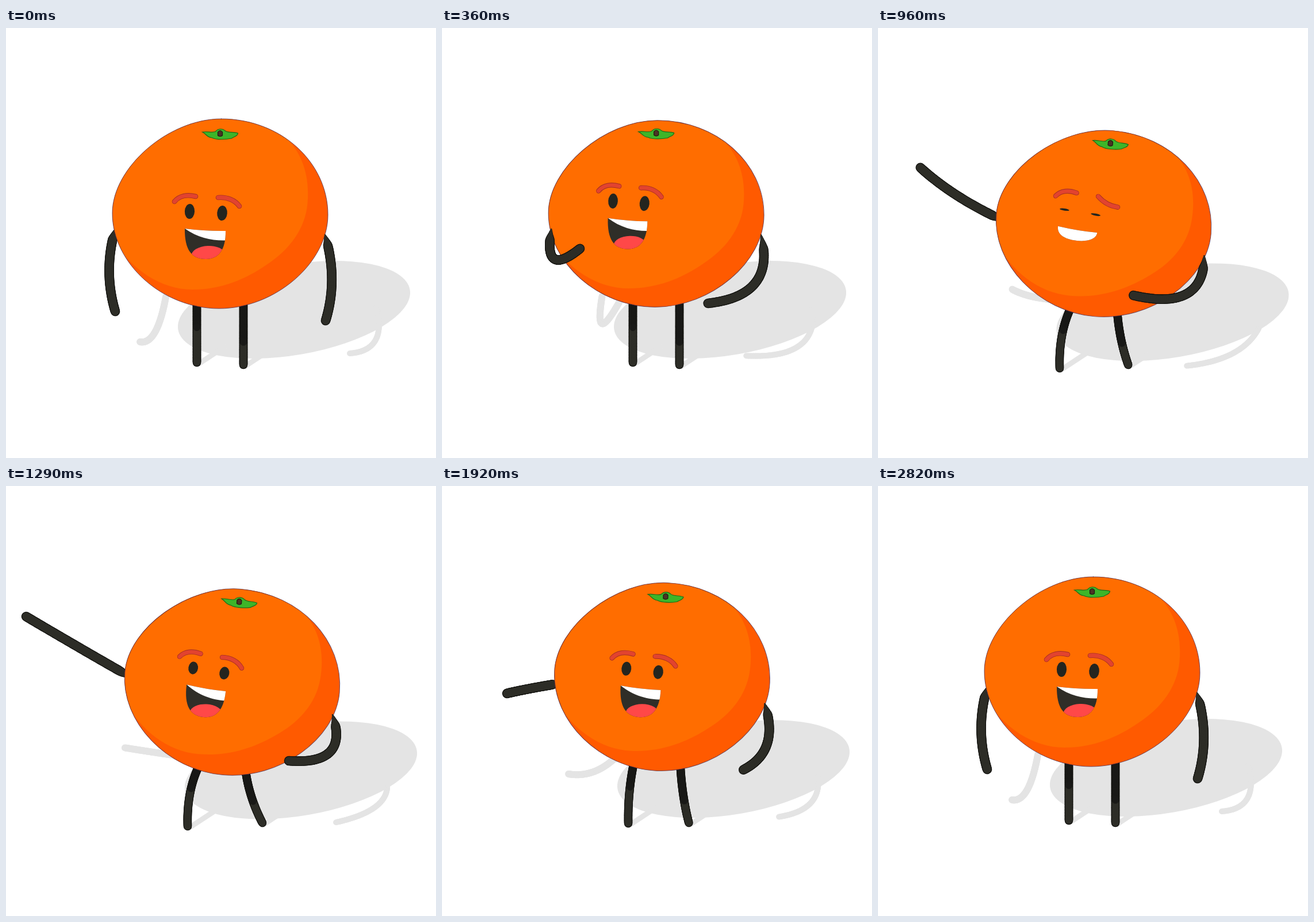
These frames come from a looping animation (748x748 px, 2850 ms). An HTML page with a canvas:

```html
<!DOCTYPE html>
<html lang="en">
<head>
<meta charset="utf-8">
<title>Pointing orange</title>
<style>
html, body { margin: 0; width: 100%; height: 100%; overflow: hidden; background: #fff; }
canvas { display: block; }
</style>
</head>
<body>
<canvas id="stage" width="748" height="748"></canvas>
<script>
const ctx = document.getElementById('stage').getContext('2d');
const LOOP = 2850, SHADE = '#e4e4e4';
const mix = (a, b, k) => a + (b - a) * k;
const ramp = (t, from, to) => {
  const u = Math.max(0, Math.min(1, (t - from) / (to - from)));
  return u * u * (3 - 2 * u);
};
// Rises from 0 to 1, stays there, and falls back as the character relaxes.
const act = (t, from, to) => ramp(t, from, to) - ramp(t, 1680, 2160);
// 1, but dipping to 0 around a moment.
const dip = (t, at, hold, fade) => ramp(Math.abs(t - at), hold, hold + fade);

// Arm poses are [elbow x, elbow y, hand x, hand y].
const BEATS = [0, 360, 600, 960, 1110, 1680, 2160];
const swing = (rest, fold, raise, reach, out) => [rest, fold, raise, reach, out, out, rest];
const LEFT = swing([169, 422, 190, 493], [175, 436, 240, 384], [144, 362, 181, 322],
  [132, 296, 74, 243], [128, 282, 35, 227]);
const RIGHT = swing([578, 437, 556, 509], [582, 466, 463, 479], [552, 509, 364, 446],
  [568, 494, 444, 465], [598, 486, 492, 478]);

// Hermite curve through the poses, flat at holds and turning points.
function pose(keys, t) {
  const last = BEATS.length - 1;
  if (t >= BEATS[last]) return keys[last];
  const i = BEATS.findIndex(b => b > t) - 1;
  const span = BEATS[i + 1] - BEATS[i], u = (t - BEATS[i]) / span, w = 1 - u;
  const slope = (j, c) => (keys[j + 1][c] - keys[j][c]) / (BEATS[j + 1] - BEATS[j]);
  const tangent = (j, c) => {
    if (j === 0 || j === last) return 0;
    const a = slope(j - 1, c), b = slope(j, c);
    return a * b <= 0 ? 0 : 2 * a * b / (a + b);
  };
  return keys[i].map((v, c) => v * w * w * (1 + 2 * u) + keys[i + 1][c] * u * u * (3 - 2 * u)
    + span * u * w * (tangent(i, c) * w - tangent(i + 1, c) * u));
}

const bend = (p, u) => [0, 1].map(k =>
  mix(mix(p[k], p[k + 2], u), mix(p[k + 2], p[k + 4], u), u));

function limb(p, radius, color, end = 1, taper = false) {
  const steps = 60;
  ctx.strokeStyle = color;
  ctx.lineCap = 'round';
  for (let i = 0; i < steps; i++) {
    const u = i / steps * end;
    ctx.lineWidth = 2 * radius * (taper ? Math.min(1, .15 + u * 7) : 1);
    ctx.beginPath();
    ctx.moveTo(...bend(p, u));
    ctx.lineTo(...bend(p, (i + 1) / steps * end));
    ctx.stroke();
  }
}

function arm(p) {
  limb(p, 8.3, '#12120f', 1, true);
  limb(p, 7, '#2d2d27', 1, true);
}

function leg(p, shaded) {
  limb(p, 7.3, '#12120f');
  limb(p, 6.1, '#2d2d27');
  limb(p, 6.1, '#191917', shaded);
}

function shape(d, fill, stroke, width = 1) {
  const path = new Path2D(d);
  if (fill) { ctx.fillStyle = fill; ctx.fill(path); }
  if (stroke) { ctx.strokeStyle = stroke; ctx.lineWidth = width; ctx.stroke(path); }
  return path;
}

function oval(x, y, rx, ry, angle, fill) {
  ctx.fillStyle = fill;
  ctx.beginPath();
  ctx.ellipse(x, y, rx, ry, angle, 0, 7);
  ctx.fill();
}

function place(x, y, degrees, sx, sy) {
  ctx.save();
  ctx.translate(x, y);
  ctx.rotate(degrees * Math.PI / 180);
  ctx.scale(sx, sy);
}

// Casts an arm on the ground; the resting hand lands on (x, y).
function castArm(p, rest, x, y, lean, radius) {
  const cast = (px, py, sag) => {
    const dx = px - rest[2], dy = py - rest[3];
    return [x + .84 * dx - .316 * dy + 20 * lean + 25 * sag,
      y - .2225 * dx + .553 * dy + 22 * lean + 40 * sag];
  };
  limb([...cast(p[0], p[1], 0), ...cast(p[2], p[3], 1 - lean), ...cast(p[4], p[5], 0)], radius, SHADE);
}

function castLeg(x, y, length) {
  ctx.lineWidth = 9;
  ctx.beginPath();
  ctx.moveTo(x + 5, y + 1);
  ctx.lineTo(x + 5 + length, y + 1 - length * .66);
  ctx.stroke();
}

function drawBody(x, y, lean, turn) {
  const skin = 'M2-165C105-165 187.5-90 187.5 2C187.5 85 96 165-2 165C-100 165-187.5 87-187.5-1C-187.5-80-90-165 2-165Z';
  place(x, y, 5 * lean, 1, 1 - .016 * turn);
  const path = shape(skin, '#ff5a00');
  ctx.save();
  ctx.clip(path);
  shape('M116-131C150-96 155-53 152-18C148 27 120 63 82 88C45 114 2 132-48 132C-103 132-153 97-181 52L-230 50V-200H116Z', '#ff6d00');
  ctx.restore();
  shape(skin, null, 'rgba(70,35,75,.75)');
  ctx.translate(0, -139 - 3 * turn);
  shape('M-31-3C-22-5-14-1-8-4C-3-10 5-9 9-5C15-1 23-4 31-1C31 4 24 5 20 8C10 10-6 11-14 7C-24 6-24 0-31-3Z', '#3db529', '#1e6b18', 1.2);
  shape('M-4 3V-3Q0-8 4-3V3Q0 6-4 3Z', '#4b3424', '#201711', 1.2);
  ctx.restore();
}

function drawFace(x, y, lean, turn, eyes, mouth) {
  const shut = 1 - mouth, tall = mix(1.9, 13 - 2 * lean, eyes);
  place(x - 25 + turn * (7 * lean - 23), y - 2.5 - 17.5 * turn, 1.3 * turn + 5 * lean, 1 - .03 * turn, 1);
  oval(-28, -1.5, 8.6, tall, .04, '#24251f');
  oval(28.5, 1.5, 8.8, tall, .08, '#24251f');

  ctx.save();
  ctx.translate(8 * shut, -5 * shut);
  const left = 'M-54.5-18.5C-46-29-32-31-17.5-27.5';
  const right = `M21.5-25.5C${mix(31, 37, mouth)} ${mix(-17, -27, mouth)} ${mix(43, 51, mouth)} ${mix(-11, -21, mouth)} 58.5-10.5`;
  ctx.lineCap = 'round';
  for (const brow of [left, right]) {
    shape(brow, null, '#a52f22', 8.6);
    shape(brow, null, '#e2432f', 6.8);
  }
  ctx.restore();

  const low = mix(50, 81.5, mouth), corner = mix(42, 66, mouth), drop = 34 * shut;
  ctx.save();
  ctx.clip(shape(`M-36.5 28.5Q0 33 34.5 32.5C35 ${corner} 22 ${low} 0 ${low}C-24 ${low}-37 ${corner}-36.5 28.5Z`, '#2f2e28'));
  oval(4, 74, 29, 15.5, -.05, '#ff4848');
  shape(`M-37 28L36 30V49C12 ${50 + drop}-13 ${45 + drop}-37 ${28 + drop * .6}Z`, '#fff');
  ctx.restore();
  ctx.restore();
}

function draw(t) {
  const lean = act(t, 330, 1050), turn = act(t, 0, 360);
  const stepLeft = act(t, 480, 810), stepRight = act(t, 720, 1110);
  const x = 372.5 + 21 * lean, y = 323 + 18 * lean;
  const leftArm = [190 + 33 * lean, 350 - 14 * lean, ...pose(LEFT, t)];
  const rightArm = [555 + 13 * lean, 360 + 38 * lean, ...pose(RIGHT, t)];
  const leftLeg = [332 + 3 * lean, 478 + 10 * lean, 332 - 18 * stepLeft, 533, 332 - 16 * stepLeft, 582 + 10 * stepLeft];
  const rightLeg = [413 + 3 * lean, 478 + 12 * lean, 413 + 9 * stepRight, 540, 413 + 33 * stepRight, 586];
  const folded = t > 120 && t < 530;

  ctx.clearRect(0, 0, 748, 748);
  oval(501 + 12 * lean, 490 + 4.5 * lean, 204.6, 78.6, -.171, SHADE);
  castArm(leftArm, LEFT[0], 233, 546, lean, 6);
  castArm(rightArm, RIGHT[0], 598, 566, lean, 5);
  castLeg(leftLeg[4], leftLeg[5], 43);
  castLeg(rightLeg[4], rightLeg[5], 27);

  leg(leftLeg, .4);
  leg(rightLeg, .6);
  if (!folded) arm(leftArm);
  drawBody(x, y, lean, turn);
  const eyes = Math.min(dip(t, 960, 25, 110), dip(t, 2700, 10, 105));
  drawFace(x, y, lean, turn, eyes, dip(t, 960, 45, 110));
  if (folded) arm(leftArm);
  arm(rightArm);
}

const start = performance.now();
function tick() {
  draw((performance.now() - start) % LOOP);
  requestAnimationFrame(tick);
}
tick();
</script>
</body>
</html>
```
